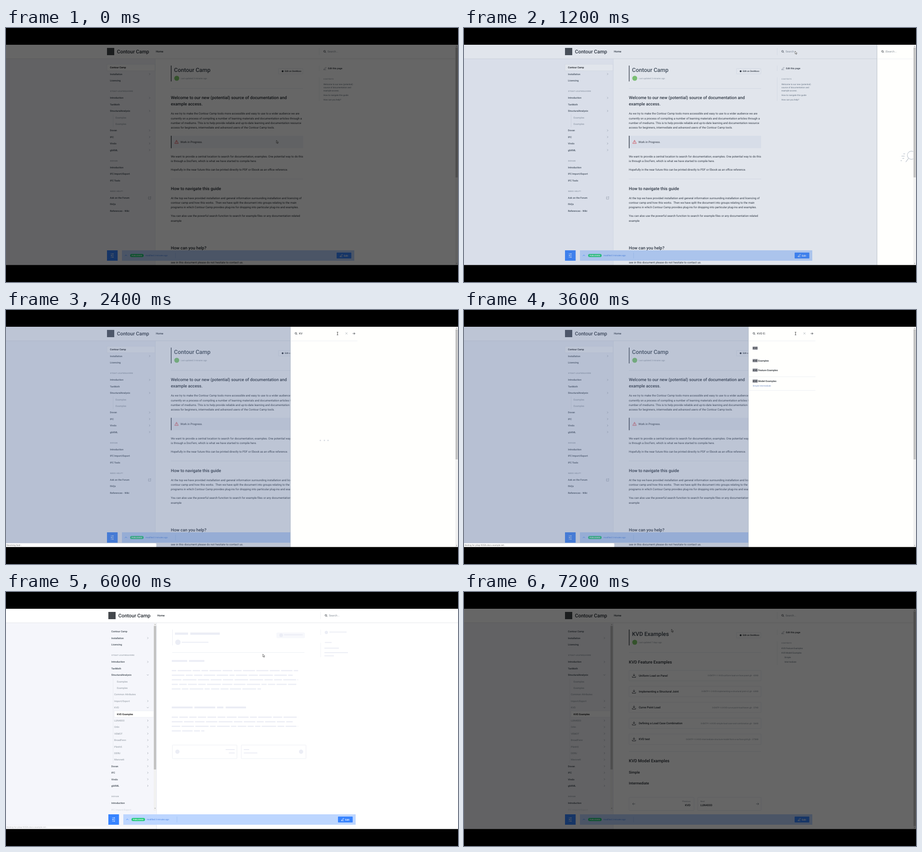
An HTML page for the animation above (7400 ms loop, 998 px wide and 561 px high).

```html
<!DOCTYPE html>
<html lang="en">
<head>
<meta charset="utf-8">
<title>Documentation search</title>
<style>
  html, body { margin: 0; width: 100%; height: 100%; overflow: hidden; background: #000; }
  svg { display: block; width: 998px; height: 561px; font-family: Roboto, Arial, sans-serif; text-rendering: geometricPrecision; }
  text { white-space: pre; }
</style>
</head>
<body>
<svg id="stage" viewBox="0 0 998 561"></svg>
<script>
const INK = '#242a31', GREY = '#8a939c', PALE = '#e4e8ef', BLUE = '#3884ff', BONE = '#ebedf5';

// Drawing helpers; text is placed by the vertical middle of its line.
const T = (x, y, s, size = 6.24, weight = 400, fill = INK, more = '') =>
  `<text x="${x}" y="${y + size * .35}" font-size="${size}" font-weight="${weight}" fill="${fill}" ${more}>${s}</text>`;
const R = (x, y, w, h, fill, more = '') => `<rect x="${x}" y="${y}" width="${w}" height="${h}" fill="${fill}" ${more}/>`;
const C = (x, y, r, fill, more = '') => `<circle cx="${x}" cy="${y}" r="${r}" fill="${fill}" ${more}/>`;
const P = (d, stroke = INK, w = .8, fill = 'none') => `<path d="${d}" stroke="${stroke}" stroke-width="${w}" fill="${fill}"/>`;
const G = (id, body) => `<g id="${id}">${body}</g>`;
const box = (x, y, w, h) => R(x, y, w, h, '#fff', `rx="1" stroke="${PALE}" stroke-width=".7"`);
const hr = (x, y, w) => R(x, y, w, .7, PALE);
const lines = (x, y, gap, list, ...style) => list.map((s, i) => T(x, y + i * gap, s, ...style)).join('');
const lens = (x, y) => C(x, y, 1.9, 'none', `stroke="${INK}" stroke-width=".8"`) + P(`M${x + 1.4} ${y + 1.4}l1.7 1.7`);
const pencil = (x, y, c) => P(`M${x - 2} ${y + 1.5}l4-4l1.2 1.2l-4 4l-1.6.4zM${x - 3} ${y + 3.2}h6`, c, .7);

function sidebar(items, chevronX, current, indent) {
  let y = 87.3, out = '';
  for (const item of items) {
    const kind = item[0], mark = item.slice(-1);
    const name = item.slice(1).replace(/[>^]$/, '');
    if (kind == '#') {
      y += 9.5;
      out += T(230, y, name, 4.2, 500, GREY, 'letter-spacing=".5"');
    } else {
      const x = [229.6, 236, 242][kind], on = name == current;
      if (on) out += R(indent, y - 7.2, (chevronX > 315 ? 329 : 323) - indent, 14.4, '#fff', `stroke="${PALE}" stroke-width=".6"`);
      out += T(x, y, name, 5.46, on || kind == 0 ? 500 : 400, on ? '#000' : kind == 0 ? '#3b454e' : GREY);
      if (mark == '>') out += P(`M${chevronX - 1} ${y - 2}l2 2l-2 2`, GREY, .7);
      if (mark == '^') out += P(`M${chevronX - 2} ${y - 1}l2 2l2-2`, GREY, .7);
    }
    y += 14.4;
  }
  return out;
}

const title = (name, when) =>
  R(364, 83, 1.3, 35, INK) + T(371, 93, name, 12.48, 500, '#3b454e') +
  C(377, 111, 5.5, '#83cf6c') + T(386, 111.3, when, 4.68, 400, GREY) +
  hr(364, 133, 292) + box(601.5, 89.5, 54, 12) + C(610.8, 95.5, 2, INK) + T(615.5, 95.5, 'Edit on DevMoss', 4.9, 500) +
  R(691, 83, .6, 12, PALE) + pencil(704, 89, GREY) + T(711, 89, 'Edit this page', 5.2, 500) +
  R(691, 109, .6, 52, PALE) + T(701, 112.3, 'CONTENTS', 3.7, 500, GREY, 'letter-spacing=".5"');
const link = (x, y, s) => T(x, y, s, 4.68, 400, '#5c6975');
const head = (y, s, size = 9.36) => T(364, y, s, size, 500);

const frame =
  R(-3, 37, 1004, 487, '#fff') + R(-3, 68, 333, 456, '#f5f6fb') + R(329.3, 68, .7, 456, PALE) +
  R(-3, 67.5, 1004, 1, '#e3e6ea') +
  R(223, 44, 16, 16, '#44484c') + T(245, 52.2, 'Contour Camp', 11, 500) + T(331, 52, 'Home', 6.1, 500) +
  R(691, 44, .6, 16, PALE) + lens(703.3, 51.5) + T(710, 52, 'Search...', 6.1, 400, GREY);

const homeSide = R(236, 191, .6, 28, '#d5dae2') + sidebar([
  '0Contour Camp', '0Installation>', '0Licencing', '#STOAT-LEAFWEAVERS', '0Introduction>', '0TanMoth',
  '0StructuralAnalysis>', '2Examples', '2Examples', '0Dovan>', '0IFC>', '0Vindo>', '0gbXML>', '#DOVAN',
  '0Introduction', '0IFC Import/Export', '0IFC Tools', '#NEED HELP?', '0Ask on the Forum', '0FAQs', '0References - Wiki'
], 317, 'Contour Camp', 223) + P('M317 373h-2.5v5h5v-2.5M317 375.5l2.6-2.6M318 372.7h1.8v1.8', GREY, .6);

const homeBody = title('Contour Camp', 'Last updated 3 minutes ago') +
  lines(701, 124.5, 6.8, ['Welcome to our new (potential)', 'source of documentation and', 'example access.'], 4.68, 400, '#5c6975') +
  link(701, 148.5, 'How to navigate this guide') + link(701, 158.5, 'How can you help?') +
  lines(364, 153.7, 14.5, ['Welcome to our new (potential) source of documentation and', 'example access.'], 9.36, 500) +
  lines(364, 189.2, 10.15, [
    'As we try to make the Contour Camp tools more accessible and easy to use to a wider audience we are',
    'currently on a process of compiling a number of learning materials and documentation articles through a',
    'number of mediums. This is to help provide reliable and up-to-date learning and documentation resource',
    'access for beginners, intermediate and advanced users of the Contour Camp tools.']) +
  R(364, 238, 292, 27.5, '#f3f5fa') + R(364, 238, 1.4, 27.5, INK) +
  P('M376.5 247.7l4 7.3h-8z', '#e5484d', .9) + P('M376.5 250v2.4m0 .8v.8', '#e5484d', .8) +
  T(385, 251.6, 'Work in Progress.') +
  lines(364, 283.6, 10.2, [
    'We want to provide a central location to search for documentation, examples. One potential way to do this',
    'is through a DocFern, which is what we have started to compile here.']) +
  T(364, 313.3, 'Hopefully in the near future this can be printed directly to PDF or Ebook as an office reference.') +
  hr(364, 333, 292) + head(354.3, 'How to navigate this guide') +
  lines(364, 375.6, 10.1, [
    'At the top we have provided installation and general information surrounding installation and licencing of',
    'contour camp and how this works.  Then we have split the document into groups relating to the main',
    'programs in which Contour Camp provides plug-ins for dropping into particular plug-ins and examples.']) +
  lines(364, 415.3, 10.1, [
    'You can also use the powerful search function to search for example files or any documentation related',
    'example']) +
  head(486, 'How can you help?') +
  T(364, 517.5, 'see in this document please do not hesitate to contact us.');

const kvdSide = R(233, 191, .6, 187, '#dfe3ea') + sidebar([
  '0Contour Camp', '0Installation>', '0Licencing', '#STOAT-LEAFWEAVERS', '0Introduction>', '0TanMoth',
  '0StructuralAnalysis^', '2Examples', '2Examples', '1Common Attributes', '1Import/Export>', '1KVD^', '2KVD Examples',
  '1LUN4000>', '1Orlin>', '1VEMOT>', '1BroadFenn>', '1Plinth5>', '1DERU>', '1Maronett>',
  '0Dovan>', '0IFC>', '0Vindo>', '0gbXML>', '#DOVAN', '0Introduction'
], 310, 'KVD Examples', 236) +
  T(229.6, 480.6, 'IFC Import/Export', 5.46, 400, '#d0d5dc') +
  R(323, 68, 6, 415, '#f1f1f1') + R(323.5, 75, 5, 317, '#c1c1c1') +
  P('M324.8 72.5l1.4-1.6l1.4 1.6zM324.8 477l1.4 1.6l1.4-1.6z', 'none', 0, '#888');

const files = [
  ['Uniform Load on Panel', '0-ENTP-1-1 KVD-uniform-load-on-face-panel.gh - 42KB'],
  ['Implementing a Structural Joint', '0-ENTP-1-2 KVD-implementing-a-structural-joint-v2.gh - 63KB'],
  ['Curve Point Load', '0-ENTP-1-3 KVD-curve-point-load-beam.gh - 37KB'],
  ['Defining a Load Case Combination', '0-ENTP-1-4 KVD-simple-load-case-and-combination.gh - 56KB'],
  ['KVD test', '0-ENTP-1-5 KVD-intermediate-structure-model-from-a-surface-grid.gh - 275KB']];
const arrow = (x, y, d) => P(`M${x - 3} ${y}h6m${d > 0 ? 0 : -6} 0l${-2.5 * d}-2.5m${2.5 * d} 2.5l${-2.5 * d} 2.5`, '#6b7681', .8);
const end = 'text-anchor="end"';
const kvdBody = title('KVD Examples', 'Last updated 7 days ago') +
  link(701, 124.2, 'KVD Feature Examples') + link(701, 134.4, 'KVD Model Examples') +
  link(707.5, 144.3, 'Simple') + link(707.5, 154.5, 'Intermediate') +
  head(154.3, 'KVD Feature Examples') +
  files.map(([name, file], i) => {
    const y = 184.7 + i * 35.1;
    return box(364.4, y - 11.5, 291.5, 23) + P(`M375.3 ${y - 4}v5m-2.4-2.4l2.4 2.4l2.4-2.4M371.6 ${y + 1.5}v2.3h7.4v-2.3`, INK, .9) +
      T(386, y, name, 6.24, 500) + T(650, y, file, 4.68, 400, GREY, end);
  }).join('') +
  hr(364, 352, 292) + head(372.3, 'KVD Model Examples') + head(397.8, 'Simple', 7.8) + head(421.8, 'Intermediate', 7.8) +
  box(364.4, 453.5, 143.5, 29) + box(516, 453.5, 140, 29) + arrow(375, 468, -1) + arrow(648, 468, 1) +
  T(500, 462.6, 'Previous', 4.68, 400, GREY, end) + T(500, 471.2, 'KVD', 6.24, 500, INK, end) +
  T(522, 462.6, 'Next', 4.68, 400, GREY) + T(522, 471.2, 'LUN4000', 6.24, 500);

// Placeholder words shown while the page loads.
let seed = 7;
const rand = () => (seed = seed * 16807 % 2147483647) / 2147483647;
const bar = (x, x2, y, h = 2.6) => R(x, y - h / 2, x2 - x, h, BONE);
function words(y, to) {
  let out = '';
  for (let x = 363; x < to;) {
    const x2 = Math.min(to, x + 10 + rand() * 22);
    out += bar(x, x2, y);
    x = x2 + 3;
  }
  return out;
}
const skeleton = R(364, 83, 1, 35, BONE) + R(691.5, 83, .7, 12, BONE) + R(691.5, 112, .7, 32, BONE) +
  bar(370, 399, 92, 5) + bar(404, 469, 92, 5) + C(376.5, 111, 6, BONE) + bar(385, 444, 111, 2) + hr(364, 133, 292) +
  R(594, 89.5, 63, 12.5, '#f7f8fc', 'rx="3"') + C(604.5, 95.5, 4, BONE) + bar(611, 652, 94.5, 2) +
  bar(363, 397, 152.3, 4) + bar(401, 435, 152.3, 4) +
  [642, 630, 642, 638, 560].map((to, i) => words(173.7 + i * 10.1, to)).join('') +
  bar(363, 409, 255, 4) + bar(413, 459, 255, 4) + bar(463, 477, 255, 4) + bar(482, 527, 255, 4) +
  [642, 630, 642, 435].map((to, i) => words(276.5 + i * 10.1, to)).join('') +
  box(364.4, 338, 142.5, 30) + box(516.4, 338, 143, 30) + C(375.5, 352.8, 4.7, BONE) + C(648.5, 352.8, 4.7, BONE) +
  bar(482, 502, 348, 2) + bar(489, 502, 355.5, 2) + bar(522, 534, 348, 2) + bar(522, 552, 355.5, 2) +
  C(704.3, 89.3, 3.6, BONE) + bar(711, 749, 88.5, 2) + bar(701, 716, 111.5, 2) + bar(700, 732, 124, 2) +
  bar(700, 752, 134, 2) + bar(700, 721, 141, 2);

const toolbar = R(223, 491, 23.5, 23, BLUE) + P('M231 499h7M231 502.5h7M231 506h7', '#fff', .7) +
  P('M236 497.8v2.4M233 501.3v2.4M236 504.8v2.4', '#fff', .9) +
  R(256, 491, 513, 23, '#bdd6ff') + P('M262.5 503.5l2.3-2.3l2.3 2.3', BLUE, .9) +
  R(274, 499, 30, 7, '#26cb7c', 'rx="3.5"') + T(289, 502.6, 'PUBLISHED', 3.9, 700, '#fff', 'text-anchor="middle" letter-spacing=".25"') +
  T(308, 502.5, 'modified 3 minutes ago', 4.68, 400, '#3d7be0') + R(374, 496, .7, 13, '#9dbff5') +
  R(730, 496, 32.5, 13, BLUE, 'rx="1"') + pencil(740, 502, '#fff') + T(746, 502.6, 'Edit', 5.46, 500, '#fff');

const mark = (x, y, w) => R(x, y - 3.6, w, 7.2, '#989aa2');
const hit = (y, rest, ex) => mark(637.3, y, 11) + (ex ? mark(ex, y, 6.2) : '') + T(637.5, y, 'KVD' + rest, 5.46, 500);
const drawer = R(628, 37, 372, 487, '#fffffd') + R(627.6, 37, .8, 487, '#a9b1bf') + hr(628, 67.8, 148) + lens(640, 51.5) +
  `<text x="647" y="54.2" font-size="6.1" fill="${INK}"><tspan id="typed"></tspan><tspan id="caret" font-weight="300">|</tspan></text>` +
  G('hint', T(648, 52, 'Search...', 6.1, 400, GREY) +
    C(704, 281, 9, '#fff', 'stroke="#c5cbd3" stroke-width="1.3"') + P('M697.5 288l-6 8M690 278h-4m3 5h-7m6 5h-4m-1 5h-3', '#c5cbd3', 1.3)) +
  G('clear', P('M749.5 49.5l4.4 4.4m0-4.4l-4.4 4.4', GREY, .6) + P('M765.5 52h5m-2.2-2.3l2.3 2.3l-2.3 2.3', INK, .8)) +
  G('dots', C(694, 288, 1.5, '#d3d7de') + C(703, 288, 1.5, '#d3d7de') + C(711, 288, 1.5, '#d3d7de')) +
  G('first', hit(84.3, '') + hit(111.8, ' Examples') + hit(132.8, ' Feature Examples') + hr(628, 147, 148) +
    hit(157, ' Model Examples') + T(637.5, 167.8, 'Simple Intermediate', 4.5, 400, '#6584c0') + hr(628, 177.5, 148)) +
  G('second', G('hover', R(628.4, 73, 149, 23, '#f5f7fc')) + hit(84.3, ' Examples', 649.2) + hit(105.5, ' Feature Examples', 669) +
    hit(129.5, ' Model Examples', 666) + T(637.5, 140.5, 'Simple Intermediate', 4.5, 400, GREY));

const $ = id => document.getElementById(id);
$('stage').innerHTML =
  G('page', frame + G('home', homeSide + homeBody) + G('kvd', kvdSide) + G('bones', skeleton) + G('loaded', kvdBody) + toolbar) +
  R(0, 37, 998, 487, '#5a6e96', 'id="veil"') + G('drawer', drawer) +
  G('scroll', R(992, 37, 6, 487, '#f1f1f1') + R(992.6, 43, 4.8, 287, '#c1c1c1', 'id="thumb"') +
    P('M993.6 41l1.4-1.6l1.4 1.6zM993.6 519.5l1.4 1.6l1.4-1.6z', 'none', 0, '#777')) +
  G('status', R(-3, 515, 335, 10, '#fff', 'rx="2" stroke="#ccd0d8" stroke-width=".5"') +
    `<text id="message" x="1" y="521.4" font-size="4.7" fill="#666"></text>`) +
  G('pointer',
    G('arrow', P('M0 0v6.3l1.5-1.3l1.1 2.4l1-.5l-1.1-2.3h2z', '#222', .6, '#fff')) +
    G('beam', P('M-1.5-3h3M0-3v6M-1.5 3h3', '#222', .8)) +
    G('hand', P('M-.7 .3q.7-.8 1.4 0v3l2.8.6q.8.3.6 1.2l-.7 2.9h-3.6l-2.3-3.2q.3-.9 1.8.2z', '#222', .7, '#fff'))) +
  R(0, 0, 998, 561, '#000', 'id="dark"') + R(0, 0, 998, 37, '#000') + R(0, 523.5, 998, 37.5, '#000');

const show = (id, on) => $(id).style.display = on ? '' : 'none';
const move = (id, x, y) => $(id).setAttribute('transform', `translate(${x} ${y})`);

// Linear value along [time, value] points, clamped at both ends.
function along(points, t) {
  const i = points.findIndex(p => p[0] >= t);
  if (i < 0) return points[points.length - 1][1];
  if (i == 0) return points[0][1];
  const [a, u] = points[i - 1], [b, v] = points[i];
  return u + (v - u) * (t - a) / (b - a);
}
const pathX = [[200, 597], [800, 731], [4800, 731], [5200, 689], [5700, 689], [6000, 567], [6800, 458]];
const pathY = [[200, 248], [800, 51], [4800, 51], [5200, 83], [5700, 83], [6000, 137], [6800, 82]];
const slide = [[1100, 0], [1200, .22], [1400, .87], [1600, 1], [5600, 1], [5800, .35], [6000, 0]];
const shade = [[0, .6], [200, .25], [400, 0], [6800, 0], [7000, .25], [7200, .6]];
const keys = [[3800, 'KVD EX'], [3400, 'KVD E'], [3000, 'KVD '], [2600, 'KVD'], [2200, 'KV'], [2000, 'K'], [0, '']];

function draw(now) {
  const t = Math.floor(now % 7400 / 200) * 200;
  const open = along(slide, t), next = t >= 5800, loaded = t >= 6400;
  const wide = t >= 5800 && !loaded;
  move('page', wide ? 3 : 0, 0);
  show('home', !next);
  show('kvd', next);
  show('bones', wide);
  show('loaded', loaded);
  show('scroll', !wide);
  $('thumb').setAttribute('height', next ? 474 : 287);
  $('veil').setAttribute('opacity', open && .12 + .28 * open);
  show('veil', open > 0);
  show('drawer', open > 0);
  move('drawer', 364 * (1 - open), 0);

  const typed = keys.find(k => t >= k[0])[1];
  $('typed').textContent = typed;
  show('caret', Math.floor(t / 400) % 2);
  show('hint', !typed);
  show('clear', typed);
  show('dots', t >= 2000 && t < 3200);
  show('first', t >= 3200 && t < 4200);
  show('second', t >= 4200);
  show('hover', t >= 5200);

  show('status', t >= 2200 && t < 4200 || t == 6000);
  $('status').setAttribute('opacity', t == 6000 ? .4 : 1);
  $('message').textContent = t < 2600 ? 'Resolving host...' : 'Waiting for p3ap-9352b.docs.example.net...';

  const beam = t >= 1400 && t < 5000, hand = t >= 5200 && t < 5800;
  show('beam', beam);
  show('hand', hand);
  show('arrow', !beam && !hand);
  move('pointer', along(pathX, t) + (beam ? 1 : 0), along(pathY, t) + (beam ? 1 : 0));
  $('dark').setAttribute('opacity', along(shade, t));
  requestAnimationFrame(tick);
}
const start = performance.now();
function tick() { draw(performance.now() - start); }
tick();
</script>
</body>
</html>
```
